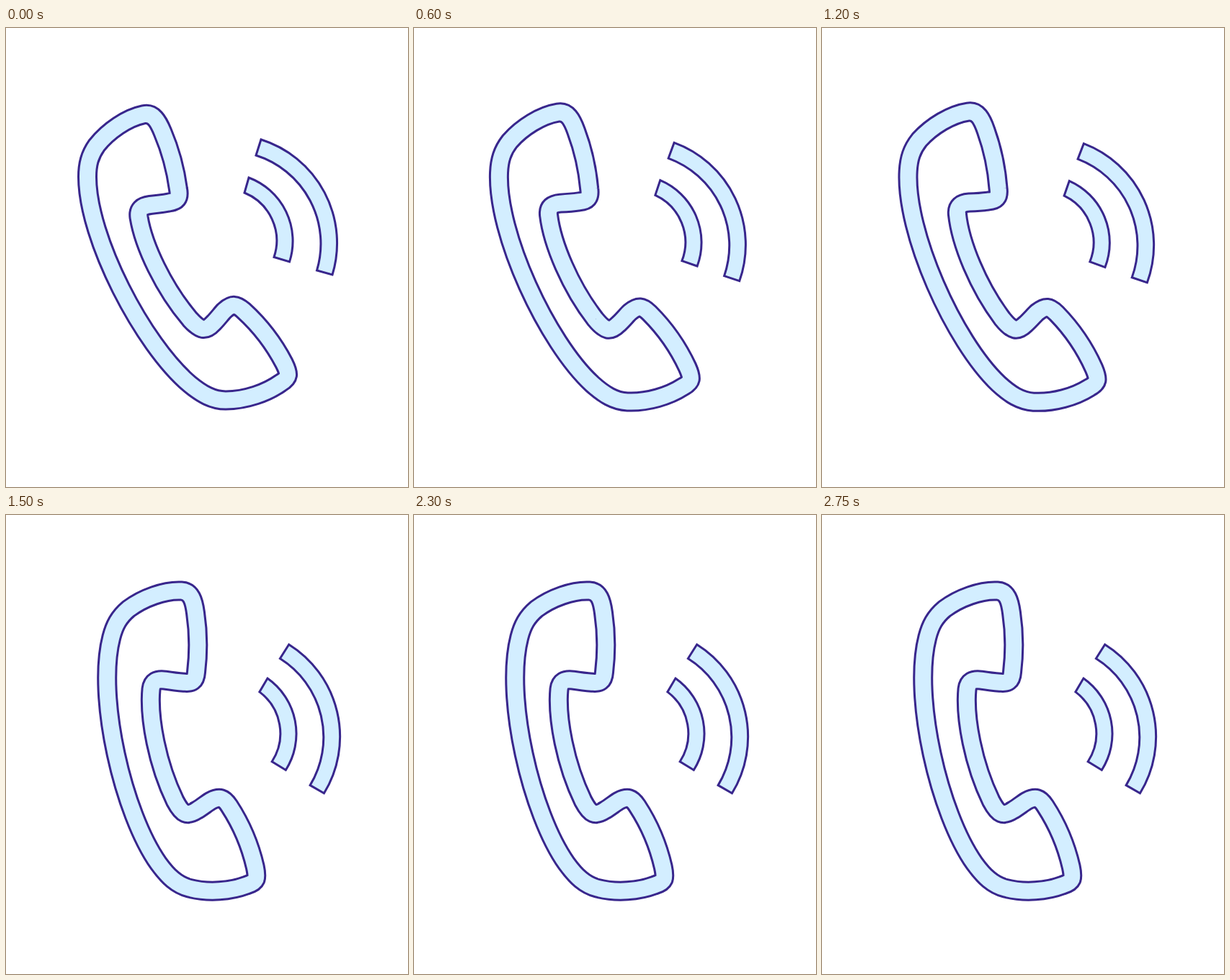
An HTML page that plays this animation: 558x638 px, repeating every 2850 ms.

```html
<!DOCTYPE html>
<html lang="en">
<head>
<meta charset="utf-8">
<title>Ringing phone</title>
<style>
  html, body { margin: 0; width: 100%; height: 100%; overflow: hidden; background: #fff; }
  svg { display: block; width: 100%; height: 100%; }
  .edge, .band { fill: none; stroke-linejoin: round; }
  .edge { stroke: #38268c; stroke-width: 28; }
  .band { stroke: #d3eeff; stroke-width: 22; }
  .wave { fill: #d3eeff; stroke: #38268c; stroke-width: 3; }
</style>
</head>
<body>
<svg viewBox="0 0 558 638">
  <defs>
    <path id="handset" d="M113 207 C113 190 116 177 126 163
      C142 143 168 125 191 120.3 C204 117.5 211 129 217.5 145
      C229 172 235.5 198 239 224 C241.5 237 237 241 226 242.5
      C215 244.5 210 245 200 246 C188.5 247.5 183 252 184.5 263
      C191 303 219 362 255.5 405 C270 421 277 422 288 410
      C294 404 299 397 303 393 C314 383 320 384 330 393
      C353 414 373 441 386 466 C393.5 481 393.5 486 381 493.5
      C362 507 333 517.5 305 517.5 C287 517.5 272 509 255 495
      C190 440 113 292 113 207 Z"/>
  </defs>
  <g id="phone">
    <use href="#handset" class="edge"/>
    <use href="#handset" class="band"/>
    <path class="wave" d="M337 208 A94 94 0 0 1 393.5 325 L372 318.5 A72 72 0 0 0 331 229 Z"/>
    <path class="wave" d="M354 155 A151 151 0 0 1 453 343 L431.5 337 A129 129 0 0 0 347 177 Z"/>
  </g>
</svg>
<script>
  const LOOP = 2850;
  const LEFT = -6.3, MIDDLE = 0.5, RIGHT = 14.5;
  // Held poses: [start in ms, tilt in degrees]
  const poses = [
    [0, 0], [300, LEFT], [600, 2.5], [900, -4.5], [1200, 3.3],
    [1500, RIGHT], [1800, MIDDLE], [2000, LEFT], [2200, MIDDLE],
    [2300, RIGHT], [2400, MIDDLE], [2500, LEFT], [2650, MIDDLE], [2750, RIGHT]
  ];
  const phone = document.getElementById('phone');

  function draw() {
    const time = performance.now() % LOOP;
    const [, tilt] = poses.findLast(([start]) => start <= time);
    const drop = tilt ? 1 : 0; // tilted poses sit one pixel lower
    phone.setAttribute('transform', `translate(0 ${drop}) rotate(${tilt} 279 319)`);
    requestAnimationFrame(draw);
  }
  draw();
</script>
</body>
</html>
```
